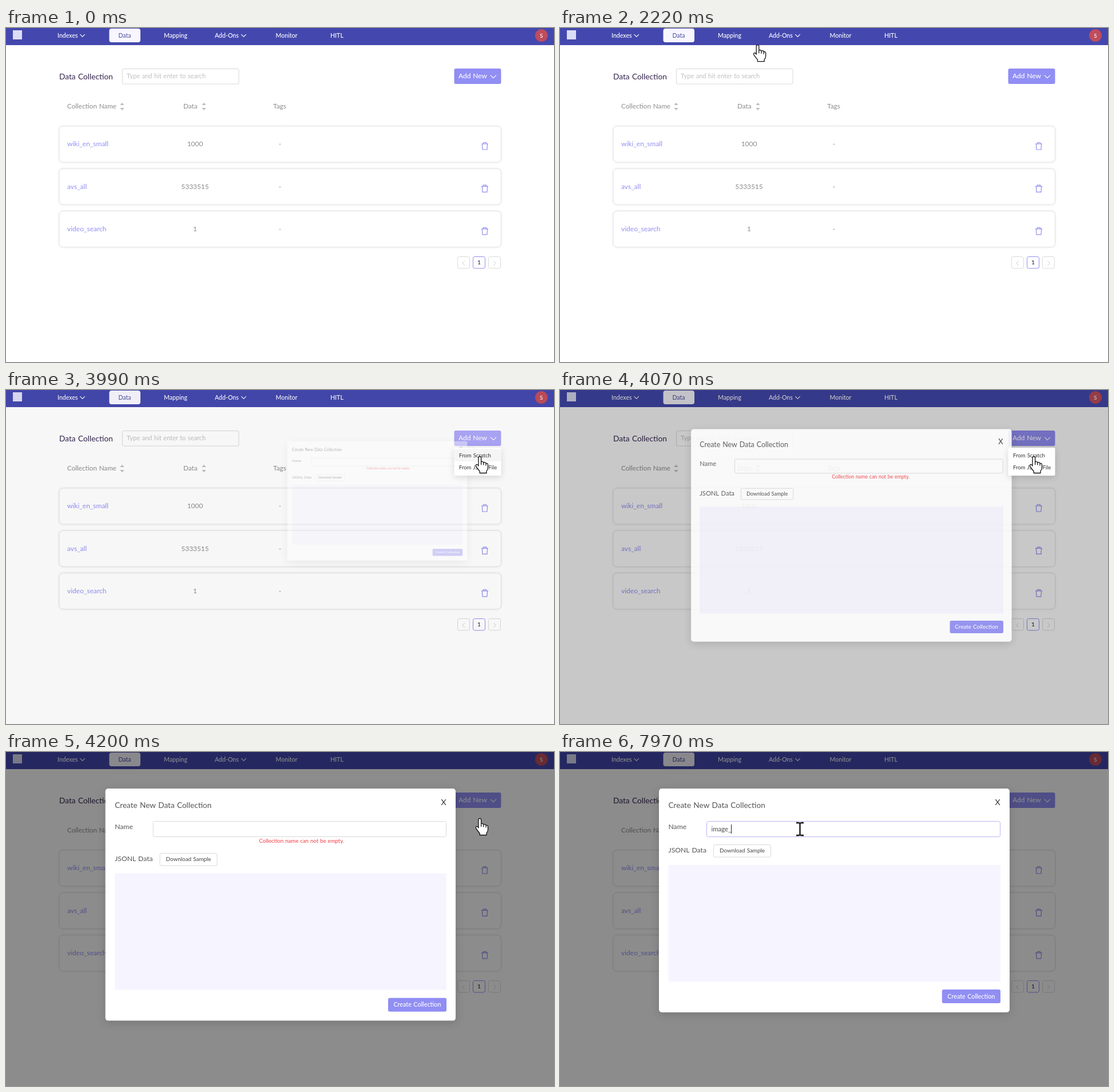
Write an HTML page with a canvas that moves like this. It is 958 px wide and 585 px high and loops after 8 s.

```html
<!DOCTYPE html>
<html lang="en">
<head>
<meta charset="utf-8">
<title>Data Collection</title>
<style>
  html, body { margin: 0; width: 100%; height: 100%; overflow: hidden; background: #fff; }
  canvas { display: block; }
</style>
</head>
<body>
<canvas id="stage" width="958" height="585"></canvas>
<script>
const stage = document.getElementById('stage');
const layer = stage.cloneNode();
let ctx = stage.getContext('2d');
const LOOP = 8000, TICK = 66.6;
const VIOLET = '#918ef4', GREY = '#8c8c8c', LINE = '#d9d9d9';

const clamp = v => Math.max(0, Math.min(1, v));
const ramp = (t, from, to) => clamp((t - from) / (to - from));
const mix = (a, b, k) => a + (b - a) * k;

// cubic-bezier(.08, .82, .17, 1)
function zoomEase(x) {
  const curve = (u, a, b) => 3 * (1 - u) ** 2 * u * a + 3 * (1 - u) * u * u * b + u ** 3;
  let lo = 0, hi = 1;
  for (let i = 0; i < 20; i++) {
    const mid = (lo + hi) / 2;
    if (curve(mid, .08, .17) < x) lo = mid; else hi = mid;
  }
  return curve(hi, .82, 1);
}

function text(str, x, y, size, color, align = 'left', weight = 400) {
  ctx.font = `${weight} ${size}px Lato, sans-serif`;
  ctx.wordSpacing = size * .06 + 'px';
  ctx.textAlign = align;
  ctx.fillStyle = color;
  ctx.fillText(str, x, y);
}

function box(x, y, w, h, r, fill, stroke) {
  ctx.beginPath();
  ctx.roundRect(x, y, w, h, r);
  if (fill) { ctx.fillStyle = fill; ctx.fill(); }
  if (stroke) { ctx.strokeStyle = stroke; ctx.lineWidth = 1; ctx.stroke(); }
}

function shadowBox(x, y, w, h, r, blur, dy, shade) {
  ctx.save();
  ctx.shadowColor = shade;
  ctx.shadowBlur = blur;
  ctx.shadowOffsetY = dy;
  box(x, y, w, h, r, '#fff');
  ctx.restore();
}

function disc(x, y, r, fill) {
  ctx.beginPath();
  ctx.arc(x, y, r, 0, 7);
  ctx.fillStyle = fill;
  ctx.fill();
}

function strokePath(d, x, y, color, width, fill) {
  ctx.save();
  ctx.translate(x, y);
  const path = new Path2D(d);
  if (fill) { ctx.fillStyle = fill; ctx.fill(path); }
  ctx.strokeStyle = color;
  ctx.lineWidth = width;
  ctx.lineJoin = 'round';
  ctx.stroke(path);
  ctx.restore();
}

function chevron(x, y, half) {
  strokePath(`M${-half},${-half / 2} L0,${half / 2} L${half},${-half / 2}`, x, y, '#fff', 1.2);
}

function sorter(x) {
  ctx.fillStyle = '#bfbfbf';
  ctx.fill(new Path2D(`M${x - 3.7},135 h7.4 l-3.7,-4.3z M${x - 3.7},140 h7.4 l-3.7,4.3z`));
}

function navBar() {
  ctx.fillStyle = '#4448ae';
  ctx.fillRect(0, 0, 958, 30);
  box(12, 4, 16, 16, 0, '#dcddf5');
  box(180.5, 1, 54.5, 24, 4, '#f8f7ff');
  text('Data', 207.5, 16.8, 10.5, '#4a4b9c', 'center');
  const items = [['Indexes', 90], ['Mapping', 276], ['Add-Ons', 365], ['Monitor', 471.5], ['HITL', 567]];
  for (const [label, x] of items) text(label, x, 16.8, 10.6, '#fff', 'left', 500);
  chevron(133.7, 13.3, 4.2);
  chevron(415.5, 13.3, 4.2);
  disc(936, 13, 11, '#bf4c5c');
  text('S', 936, 16.5, 9.8, '#fff', 'center', 500);
}

function row(y, name, count) {
  shadowBox(93, y, 772.5, 63, 7, 4, 0, 'rgba(0,0,0,.12)');
  box(93, y, 772.5, 63, 7, '#fff', '#e4e4e6');
  text(name, 107, y + 35.3, 12, VIOLET);
  text(count, 330.5, y + 35.3, 11.9, GREY, 'center');
  text('-', 479, y + 35.3, 11.9, GREY, 'center');
  strokePath('M-6,-4 H6 M-2.6,-4 V-6.2 H2.6 V-4 M-4.6,-4 L-4,6 H4 L4.6,-4', 837, y + 35, VIOLET, 1.2);
}

function pager(x, active) {
  box(x + .5, 400.5, 21, 20.5, 3, '#fff', active ? VIOLET : LINE);
}

function page(t) {
  ctx.fillStyle = '#fff';
  ctx.fillRect(0, 0, 958, 585);
  navBar();
  text('Data Collection', 93, 89.7, 13.7, '#33244d');
  box(203.5, 71.5, 203.5, 26.5, 2, '#fff', LINE);
  text('Type and hit enter to search', 211, 88.3, 11, '#bfbfbf');

  const lit = ramp(t, 3240, 3390) * (1 - ramp(t, 3960, 4040));
  box(783.5, 71, 82, 27, 3, `rgb(${mix(145, 190, lit)},${mix(142, 182, lit)},${mix(244, 253, lit)})`);
  text('Add New', 791, 88.2, 12, '#fff', 'left', 500);
  chevron(852, 85.2, 5);

  text('Collection Name', 107, 140.7, 11.7, GREY);
  text('Data', 310, 140.7, 11.8, GREY);
  text('Tags', 467, 140.7, 11.9, GREY);
  sorter(203);
  sorter(346);

  row(172, 'wiki_en_small', '1000');
  row(246.4, 'avs_all', '5333515');
  row(320.8, 'video_search', '1');

  pager(789);
  pager(816, true);
  pager(843);
  strokePath('M2,-4 L-2,0 L2,4', 800, 412, '#cfcfcf', 1);
  strokePath('M-2,-4 L2,0 L-2,4', 854.3, 412, '#cfcfcf', 1);
  text('1', 827, 414.3, 10.3, '#33244d', 'center', 500);
}

function dropdown(t) {
  if (t < 2880 || t >= 4130) return;
  shadowBox(783.5, 101, 82, 49, 2, 12, 3, 'rgba(0,0,0,.14)');
  if (t > 3350 && t < 4060) box(783.5, 103.5, 82, 21.5, 0, '#f5f5f5');
  text('From Scratch', 792, 117.6, 9.6, '#333');
  text('From JSON File', 792, 139.2, 9.5, '#333');
}

const TYPED = [[6810, 'i'], [7010, 'im'], [7150, 'ima'], [7220, 'imag'], [7280, 'image'], [7970, 'image_']];
const BLINK_OFF = [[6280, 6780], [7780, 7970]];

function nameField(t) {
  const focused = t > 5200;
  box(256.5, 121.5, 513, 27, 3, '#fff', focused ? '#b9b5f5' : LINE);
  const entry = TYPED.filter(([at]) => t >= at).pop();
  const value = entry ? entry[1] : '';
  text(value, 264.5, 138.8, 11.4, '#4a4a4a');
  if (t >= 5750 && !BLINK_OFF.some(([a, b]) => t >= a && t < b)) {
    ctx.fillStyle = '#222';
    ctx.fillRect(Math.round(264 + ctx.measureText(value).width), 127, 1, 16);
  }
}

function panel(t, tick, scale) {
  const lift = 15 * ramp(tick, 7070, 7320);
  ctx.clearRect(0, 0, 958, 585);
  ctx.save();
  ctx.translate(828, 117);
  ctx.scale(scale, scale);
  ctx.translate(-828, -117);
  shadowBox(173, 64, 613, 407 - lift, 5, 16, 4, 'rgba(0,0,0,.15)');
  text('Create New Data Collection', 189.5, 98.3, 13.6, '#555');
  text('X', 765, 93, 14, '#333', 'center');
  text('Name', 189.5, 135, 12.2, '#555');
  nameField(t);
  ctx.globalAlpha = 1 - ramp(t, 6990, 7200);
  text('Collection name can not be empty.', 516.5, 159, 9.6, '#f23c44', 'center');
  ctx.globalAlpha = 1;
  ctx.translate(0, -lift);
  text('JSONL Data', 189.5, 191, 12.2, '#555');
  box(268.5, 177.5, 100, 21.5, 2, '#fff', LINE);
  text('Download Sample', 318.5, 191.4, 9.9, '#444', 'center');
  box(189.5, 212.7, 580.5, 204.5, 0, '#f6f5ff');
  box(667.8, 431, 102.2, 24, 3, VIOLET);
  text('Create Collection', 718.8, 446.7, 10.8, '#fff', 'center', 500);
  ctx.restore();
}

function dialog(t, tick) {
  const open = tick - 3984;
  if (open <= 0) return;
  ctx.fillStyle = `rgba(0,0,0,${.45 * clamp(open / 165)})`;
  ctx.fillRect(0, 0, 958, 585);

  // the panel fades as one group
  const grow = zoomEase(clamp(open / 240));
  ctx = layer.getContext('2d');
  panel(t, tick, mix(.2, 1, grow));
  ctx = stage.getContext('2d');
  ctx.globalAlpha = grow;
  ctx.drawImage(layer, 0, 0);
  ctx.globalAlpha = 1;
}

// pointer track: time, x, y
const TRACK = [
  [530, 950, 580], [600, 943, 574], [740, 943, 574], [900, 840, 496], [1250, 310, 95], [1480, 201, 13],
  [2140, 201, 13], [2197, 344, 29], [2400, 640, 64], [2600, 780, 80], [2860, 822, 85],
  [3200, 822, 85], [3390, 828, 116], [4740, 828, 116], [5000, 620, 182], [5260, 419.5, 135], [9000, 419.5, 135]
];
// press marks: time, duration, x, y
const PRESSES = [[1670, 70, 201.5, 13.5], [2970, 70, 822.5, 85.5], [3800, 60, 828, 117], [5750, 140, 417, 133.5]];

const HAND = 'M-2,17 V2.5 Q-2,.5 .3,.5 Q2.6,.5 2.6,2.5 V9.6 Q6.2,8.8 6.8,11 Q10.4,10 11,12.4 Q14.5,12 14.5,15 ' +
  'V20 Q14.5,23.5 12,26 V29.5 H.2 V26.5 L-6,18.5 Q-7.5,15.5 -5.2,14.4 Q-3.8,14 -2,17 Z M2.6,9.6 V15 M6.8,11 V15.5 M11,12.4 V16.5';
const ARROW = 'M0,0 V21.5 L4.9,17 L8.2,24.6 L11.6,23.2 L8.4,15.8 H15 Z';
const BEAM = 'M-6.5,-11 H-2 L0,-10 L2,-11 H6.5 M0,-10 V10 M-6.5,11 H-2 L0,10 L2,11 H6.5';

function pointer(t, tick) {
  for (const [at, hold, x, y] of PRESSES)
    if (t >= at && t < at + hold) disc(x, y, 20.5, 'rgba(255,255,0,.47)');
  if (t < 530) return;
  const i = Math.max(1, TRACK.findIndex(([at]) => at > tick));
  const [t0, x0, y0] = TRACK[i - 1], [t1, x1, y1] = TRACK[i];
  const k = ramp(tick, t0, t1), x = mix(x0, x1, k), y = mix(y0, y1, k);
  if (t > 5200 && x < 769) strokePath(BEAM, x, y, '#111', 2.3);
  else if (y < 30 || (tick < 4750 && x > 784 && y > 71 && y < 150)) strokePath(HAND, x, y, '#111', 1.3, '#fff');
  else strokePath(ARROW, x, y, '#111', 1.3, '#fff');
}

function draw(now) {
  const t = now % LOOP;
  const tick = Math.floor(t / TICK + .12) * TICK;
  page(t);
  dialog(t, tick);
  dropdown(t);
  pointer(t, tick);
  requestAnimationFrame(draw);
}
requestAnimationFrame(draw);
</script>
</body>
</html>
```
